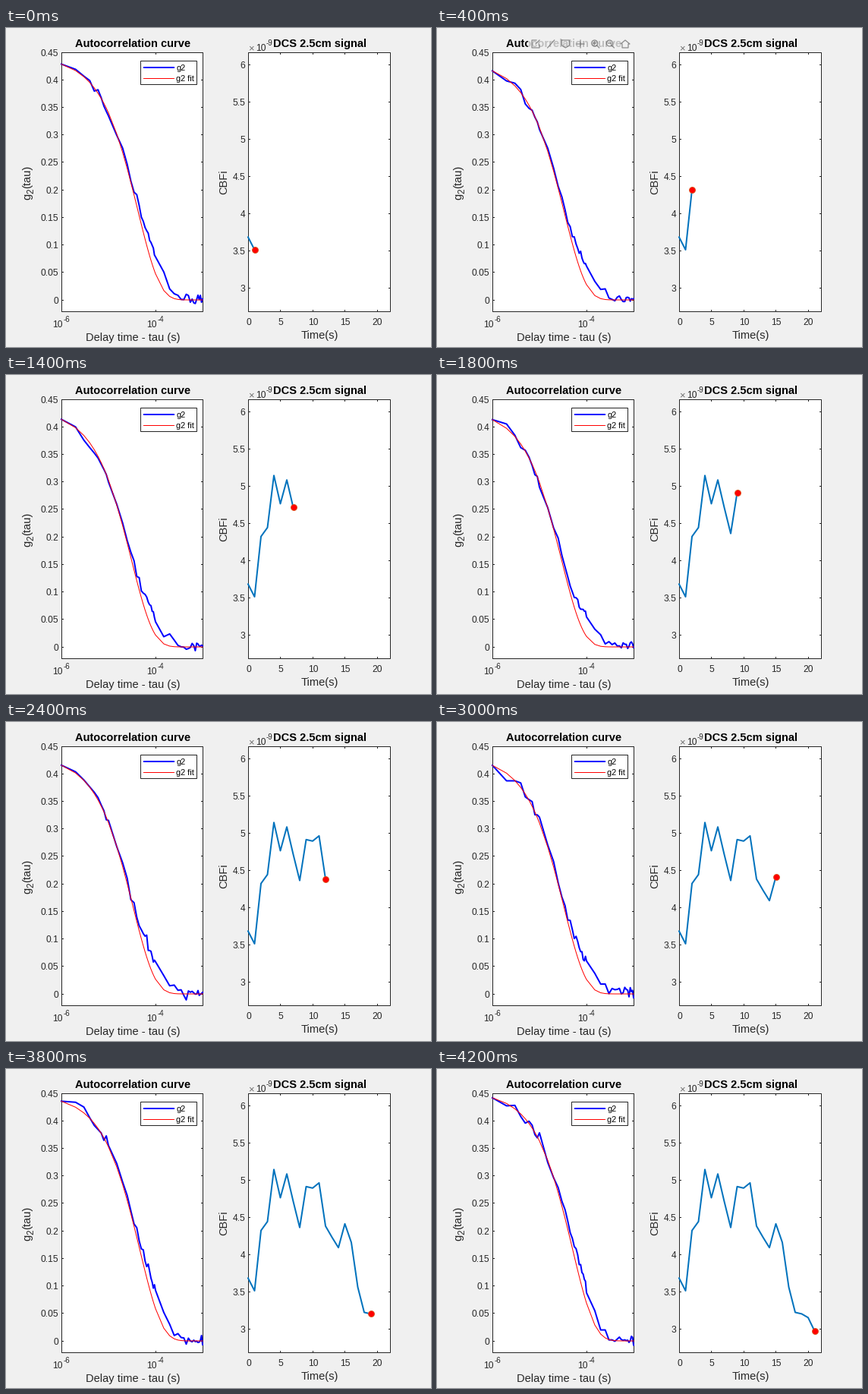
These frames come from a looping animation (560 by 420 pixels, 4400 ms). A matplotlib script:

```python
import numpy as np
import matplotlib.pyplot as plt
from matplotlib.animation import FuncAnimation
from matplotlib.patches import Circle, Rectangle

W, H, DPI = 560, 420, 80
PT = 72 / DPI                      # points per pixel
STEPS, INTERVAL = 22, 200
INK, PANEL, GRAY = "#262626", "#f0f0f0", "#6e6e6e"
BLUE, RED = "#0000ff", "#ff0000"

plt.rcParams["font.family"] = "Liberation Sans"
plt.rcParams["path.snap"] = False  # coordinates already sit on pixel centres
fig = plt.figure(figsize=(W / DPI, H / DPI), dpi=DPI, facecolor=PANEL)
ax = fig.add_axes([0, 0, 1, 1])
ax.set(xlim=(0, W), ylim=(H, 0))
ax.axis("off")

# Blood flow index (1e-9), one sample per second
FLOW = np.array([3.68, 3.51, 4.32, 4.44, 5.14, 4.76, 5.08, 4.71, 4.36, 4.91, 4.89,
                 4.96, 4.38, 4.23, 4.09, 4.41, 4.16, 3.56, 3.22, 3.20, 3.15, 2.97])
# Delay times in microseconds
LAGS = np.r_[1:10, 10:100:5, 100:1001:50].astype(float)


def lag_x(lag):
    return 73 + 62 * np.log10(lag)


def corr_y(g):
    return 358 - 724.4 * g


def time_x(t):
    return 319 + 8.5 * t


def flow_y(v):
    return 342 - 98 * (v - 3)


def fit(flow):
    """Stretched decay: faster flow decorrelates sooner."""
    start = 0.413 + 0.007 * (5 - flow) ** 2
    return start * np.exp((1 - LAGS ** 0.93) * flow / 114)


def measured(sec):
    """The fit plus a late shoulder and detector noise."""
    rng = np.random.default_rng(40 + sec)
    shoulder = 0.031 * np.exp(-0.5 * ((np.log10(LAGS) - 1.98) / 0.25) ** 2)
    noise = rng.normal(0.001, 0.005, LAGS.size)
    noise[0] = 0
    return fit(FLOW[sec]) + shoulder + noise


def line(xs, ys, color=INK, width=1.0, z=2, **kw):
    return ax.plot(xs, ys, color=color, lw=width * PT, zorder=z, **kw)[0]


def text(x, y, s, px=12, color=INK, ha="left", **kw):
    return ax.text(x, y, s, fontsize=px * PT, color=color, ha=ha,
                   va="baseline", rotation_mode="anchor", zorder=6, **kw)


def box(x0, y0, x1, y1, z):
    ax.add_patch(Rectangle((x0, y0), x1 - x0, y1 - y0, facecolor="white",
                           edgecolor=INK, lw=PT, zorder=z))


def x_tick(x):
    for y, inward in ((373.5, -2.5), (32.5, 2.5)):
        line([x, x], [y, y + inward], solid_capstyle="butt", z=1.5)


def y_tick(x0, x1, y, label):
    y = np.floor(y) + 0.5
    for x, inward in ((x0, 2.5), (x1, -2.5)):
        line([x, x + inward], [y, y], solid_capstyle="butt", z=1.5)
    text(x0 - 4, y + 4.5, label, ha="right")


def power(x, y, exponent):
    text(x, y, "10")
    text(x + 13.7, y - 7, exponent, 9.8)


def title(x, s):
    text(x, 25, s, 14.67, "black", "center", weight="bold")


# Left plot
box(73.5, 32.5, 259.5, 373.5, 1)
for g in np.arange(0, 0.46, 0.05):
    y_tick(73.5, 259.5, corr_y(g), f"{g:.2g}")
for exponent in (-6, -4):
    x = 73.5 + 62 * (exponent + 6)
    x_tick(x)
    power(x - 12, 394, str(exponent))
title(167, "Autocorrelation curve")
text(167.5, 412, "Delay time - tau (s)", 14.67, ha="center")
text(32, 226, "g", 14.67, rotation=90)
text(36, 217.8, "2", 11.7, rotation=90)
text(32, 211.3, "(tau)", 14.67, rotation=90)

# Right plot
box(319.5, 32.5, 506.5, 373.5, 1)
for v in np.arange(3, 6.1, 0.5):
    y_tick(319.5, 506.5, flow_y(v), f"{v:g}")
for t in range(0, 21, 5):
    x_tick(np.floor(time_x(t)) + 0.5)
    text(time_x(t) + 0.5, 391, str(t), ha="center")
title(413, "DCS 2.5cm signal")
text(413, 409, "Time(s)", 14.67, ha="center")
text(291, 203, "CBFi", 14.67, ha="center", rotation=90)
text(318.7, 30, "×", 13, GRAY)
power(329, 30, "-9")

# Legend
box(177.5, 43.5, 251.5, 74.5, 4)
line([181, 222], [52, 52], BLUE, 2, 5, solid_capstyle="butt")
line([181, 222], [66.5, 66.5], RED, 1, 5, solid_capstyle="butt")
text(224.5, 55.5, "g2", 10.8, "black")
text(224.5, 70, "g2 fit", 10.8, "black")

# Moving parts
data = line([], [], BLUE, 2, 2)
model = line([], [], RED, 1, 3)
trace = line([], [], "#0072bd", 2, 2)
dot = line([], [], z=3, marker="o", ms=8 * PT, mfc=RED, mec="#d95319", mew=0.8 * PT)


def make_toolbar():
    """Hover buttons above the left plot: edit, pan, zoom and home."""
    parts = [ax.add_patch(Rectangle((120, 13), 138, 16, fc=PANEL, ec="none", zorder=7))]

    def stroke(x, xs, ys):
        parts.append(line(x + np.array(xs), 21 + np.array(ys), GRAY, 1.2, 8))

    export, brush, tip, pan, zoom_in, zoom_out, home = np.linspace(130, 248, 7)
    stroke(export, [1, -5, -5, 5, 5], [-5, -5, 5, 5, 1])
    stroke(export, [0, 5], [0, -5])
    stroke(brush, [5, -4], [-5, 5])
    stroke(tip, [-5, 5, 5, 0, -5, -5], [-5, -5, 2, 5, 2, -5])
    stroke(pan, [-5, 5], [0, 0])
    stroke(pan, [0, 0], [-5, 5])
    for x in (zoom_in, zoom_out):
        parts.append(ax.add_patch(Circle((x - 1, 20), 4, fill=False, ec=GRAY,
                                         lw=1.2 * PT, zorder=8)))
        stroke(x, [2, 5], [2, 5])
        stroke(x, [-3, 1], [-1, -1])
    stroke(zoom_in, [-1, -1], [-3, 1])
    stroke(home, [-6, 0, 6, 4, 4, -4, -4], [0, -5, 0, 0, 5, 5, 0])
    return parts


toolbar = make_toolbar()


def draw(step):
    sec = max(step, 1)
    past = np.arange(sec + 1)
    data.set_data(lag_x(LAGS), corr_y(measured(sec)))
    model.set_data(lag_x(LAGS), corr_y(fit(FLOW[sec])))
    trace.set_data(time_x(past), flow_y(FLOW[past]))
    dot.set_data([time_x(sec)], [flow_y(FLOW[sec])])
    # The buttons show early on, then fade out
    alpha = np.clip((4 - step) * 0.4, 0, 0.8) if step else 0
    for part in toolbar:
        part.set_alpha(alpha)
    return data, model, trace, dot, *toolbar


anim = FuncAnimation(fig, draw, frames=STEPS, interval=INTERVAL,
                     repeat=True, repeat_delay=0, blit=False)
plt.show()
```
